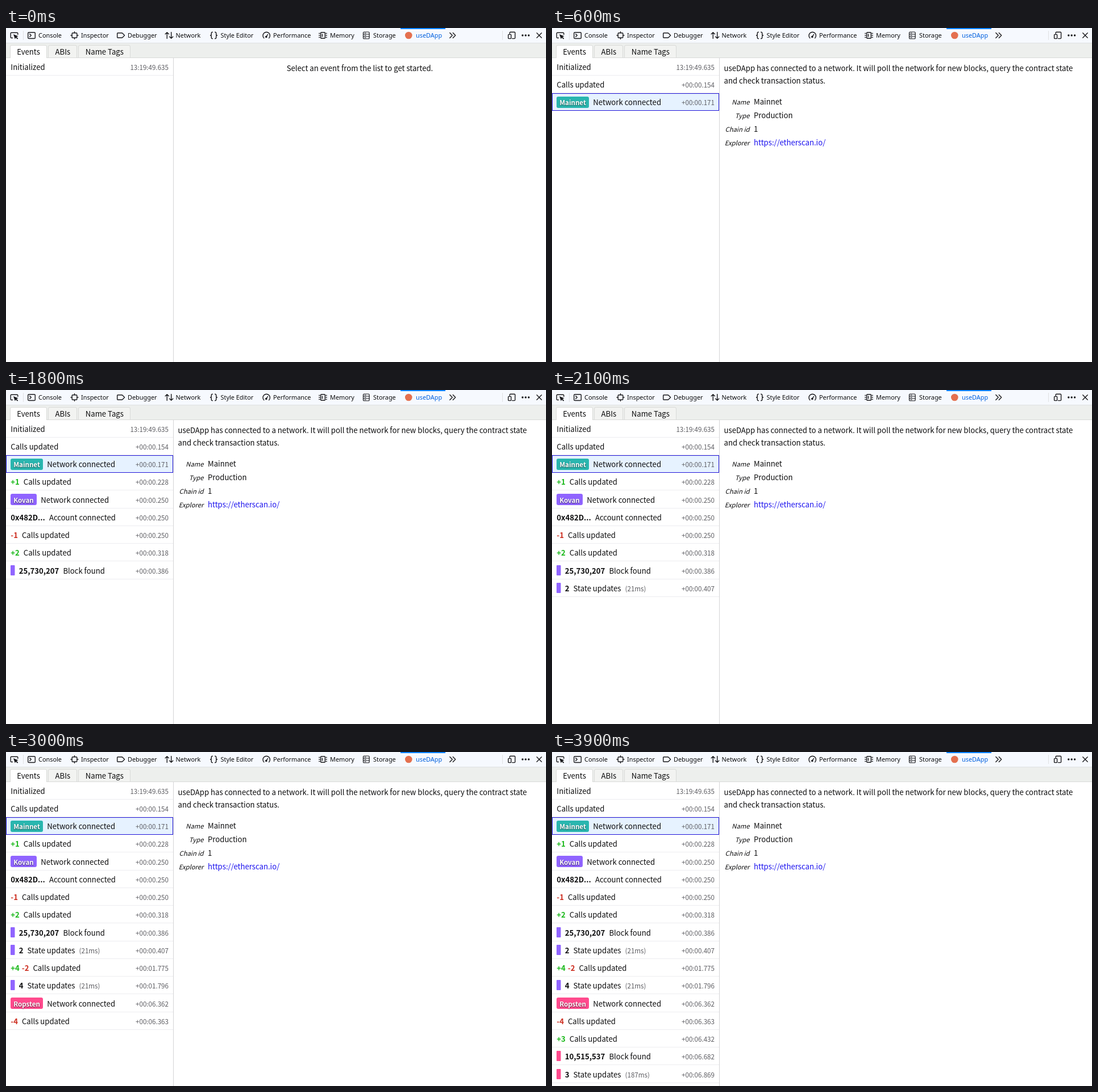
An HTML page that plays this animation: 950 px wide and 589 px high, repeating every 4200 ms.

```html
<!DOCTYPE html>
<html lang="en">
<head>
<meta charset="utf-8">
<title>Event log panel</title>
<style>
  html, body { margin: 0; width: 100%; height: 100%; overflow: hidden; background: #fff; }
  svg { display: block; width: 950px; height: 589px; }
  text { font: 13.15px "Noto Sans CJK JP", "Noto Sans CJK SC", "Noto Sans CJK", sans-serif; fill: #0c0c0d; white-space: pre; }
  .bar text { font: 10.9px "Noto Sans", "Open Sans", sans-serif; fill: #0c0c0d; }
  .bar .on { fill: #0060df; }
  .icon { fill: none; stroke: #18181b; stroke-width: 1.4; stroke-linejoin: round; stroke-linecap: round; }
  .fine { stroke-width: 1.2; }
  .solid { fill: #18181b; stroke: none; }
  .bold { font-weight: 700; }
  .plus { font-weight: 700; fill: #18b818; }
  .minus { font-weight: 700; fill: #cc2b1d; }
  .small { font-size: 11.6px; fill: #5c5c61; }
  .time { text-anchor: end; }
  .badge { font-size: 11.6px; font-weight: 700; fill: #fff; text-anchor: middle; text-shadow: 0 1px 2px #000a; }
  .label { font-size: 11.3px; font-style: italic; text-anchor: end; }
  .link { fill: #1a10ee; }
</style>
</head>
<body>
<svg viewBox="0 0 950 589" xmlns="http://www.w3.org/2000/svg">
  <g class="bar">
    <path fill="#f6f9fe" d="M0 0H950V26H0z"/>
    <path fill="#dfe0e2" d="M0 26H950V27H0zM30 5H31V21H30zM873 5H874V21H873z"/>
    <path fill="#0a84ff" d="M694 0H773V2H694z"/>
    <g class="icon">
      <path d="M11.5 17.5H9.5Q8.2 17.5 8.2 16.2V9.5Q8.2 8.2 9.5 8.2H19.5Q20.8 8.2 20.8 9.5V11.5"/>
      <path class="solid" d="M13 11L21.5 14.5L18.6 15.8L21.3 18.5L20 19.8L17.3 17.1L15.8 19.6z"/>
      <rect x="38.7" y="7.7" width="12.6" height="10.8" rx="1.6"/>
      <path d="M41.7 10.6L44.3 13.1L41.7 15.6"/>
      <rect x="116.2" y="8.7" width="8.6" height="8.6" rx="1"/>
      <path d="M120.5 6.5V8M120.5 18V19.5M114 13H115.5M125.5 13H127"/>
      <path d="M196.7 8.7H203.6Q204.5 8.7 205.2 9.5L208.6 13L205.2 16.5Q204.5 17.3 203.6 17.3H196.7Q195.7 17.3 195.7 16.3V9.7Q195.7 8.7 196.7 8.7z"/>
      <path d="M283.3 18.5V7.8M280.2 10.8L283.3 7.7L286.4 10.8M290.7 7.5V18.2M287.6 15.2L290.7 18.3L293.8 15.2"/>
      <path d="M363.3 7.3Q361.3 7.3 361.3 9.2V11.2Q361.3 13 359.5 13Q361.3 13 361.3 14.8V16.8Q361.3 18.7 363.3 18.7M367.7 7.3Q369.7 7.3 369.7 9.2V11.2Q369.7 13 371.5 13Q369.7 13 369.7 14.8V16.8Q369.7 18.7 367.7 18.7"/>
      <path d="M453.8 17.8A6.2 6.2 0 1 1 462.6 17.8M457.8 15.2L460.6 11.4"/>
      <circle class="solid" cx="457.8" cy="15.6" r="1.8"/>
      <rect x="553.7" y="7.7" width="7.6" height="10.6" rx="1"/>
      <path d="M550.8 9.5H552M550.8 13H552M550.8 16.5H552M563 9.5H564.2M563 13H564.2M563 16.5H564.2M556.5 11V15"/>
      <g class="fine">
        <rect x="628.5" y="7" width="10.6" height="12" rx="1.6"/>
        <path d="M628.5 11H639M628.5 15H639M631 9H633M631 13H633M631 17H633"/>
      </g>
      <path d="M780.8 8.5L785.2 13L780.8 17.5M786.3 8.5L790.7 13L786.3 17.5"/>
      <path d="M886.2 10V8.3Q886.2 7.2 887.3 7.2H894.5Q895.6 7.2 895.6 8.3V17.5Q895.6 18.6 894.5 18.6H890.5"/>
      <rect x="883.6" y="11.4" width="5" height="7.2" rx="0.9"/>
      <path d="M933.8 8.8L942.2 17.2M942.2 8.8L933.8 17.2"/>
      <g class="solid"><circle cx="908.8" cy="13" r="1.7"/><circle cx="914.2" cy="13" r="1.7"/><circle cx="919.6" cy="13" r="1.7"/></g>
    </g>
    <circle cx="708.3" cy="13" r="6.3" fill="#e4704f"/>
    <g id="tools"></g>
  </g>
  <path fill="#edefed" d="M0 27H950V52H0z"/>
  <path fill="#d9dad9" d="M0 52H950V53H0z"/>
  <g id="tabs"></g>
  <g id="list"></g>
  <path fill="#d4d4d6" d="M294 53H295V589H294z"/>
  <g id="prompt"><text x="622.5" y="76" text-anchor="middle">Select an event from the list to get started.</text></g>
  <g id="detail">
    <text x="302.5" y="76">useDApp has connected to a network. It will poll the network for new blocks, query the contract state</text>
    <text x="302.5" y="98">and check transaction status.</text>
  </g>
</svg>
<script>
const LOOP = 4200;
const TEAL = '#29b6af', VIOLET = '#9064ff', PINK = '#ff4a8d';
const byId = id => document.getElementById(id);
const text = (x, y, str, cls = '') => `<text x="${x}" y="${y}" class="${cls}">${str}</text>`;
const rect = (x, y, w, h, fill, extra = '') =>
  `<rect x="${x}" y="${y}" width="${w}" height="${h}" fill="${fill}" ${extra}/>`;

// Parts of a row: [string, class, gap before]
const plain = str => [str, '', 7];
const calls = (...diffs) => ({
  parts: [...diffs.map((d, i) => [d, d[0] === '+' ? 'plus' : 'minus', i ? 4 : 0]), plain('Calls updated')]
});
const network = (name, color, width) => ({ badge: { name, color, width }, parts: [plain('Network connected')] });
const block = (num, color) => ({ color, parts: [[num, 'bold', 0], plain('Block found')] });
const state = (num, ms, color) => ({
  color, parts: [[num, 'bold', 0], plain('State updates'), [`(${ms}ms)`, 'small', 7]]
});

// [appears at ms, time label, row]
const rows = [
  [0, '13:19:49.635', { parts: [['Initialized', '', 0]] }],
  [300, '+00:00.154', { parts: [['Calls updated', '', 0]] }],
  [600, '+00:00.171', { ...network('Mainnet', TEAL, 57), selected: true }],
  [900, '+00:00.228', calls('+1')],
  [1200, '+00:00.250', network('Kovan', VIOLET, 46)],
  [1200, '+00:00.250', { parts: [['0x482D...', 'bold', 0], plain('Account connected')] }],
  [1200, '+00:00.250', calls('-1')],
  [1500, '+00:00.318', calls('+2')],
  [1800, '+00:00.386', block('25,730,207', VIOLET)],
  [2100, '+00:00.407', state('2', 21, VIOLET)],
  [2400, '+00:01.775', calls('+4', '-2')],
  [2700, '+00:01.796', state('4', 21, VIOLET)],
  [3000, '+00:06.362', network('Ropsten', PINK, 57)],
  [3000, '+00:06.363', calls('-4')],
  [3300, '+00:06.432', calls('+3')],
  [3600, '+00:06.682', block('10,515,537', PINK)],
  [3900, '+00:06.869', state('3', 187, PINK)]
];

function drawRow([, time, row], i) {
  const top = 52.25 + 31.25 * i;
  const end = Math.round(top + 31.25);
  const base = Math.round(top + 21.3);
  let x = 8.3, out = '';
  if (row.selected) {
    const y = Math.round(top);
    out += rect(0.5, y + 0.5, 293, end - y - 1, '#e6f2ff', 'stroke="#1f14d8"');
  } else {
    out += rect(0, end - 1, 294, 1, '#ededf0');
  }
  if (row.badge) {
    const { name, color, width } = row.badge;
    out += rect(8, Math.round(top + 6), width, 20, color, 'rx="3"');
    out += text(8 + width / 2, base, name, 'badge');
    x += width;
  }
  if (row.color) {
    out += rect(8, Math.round(top + 6.4), 7.5, 18, row.color, 'rx="1"');
    x = 22.8;
  }
  const spans = row.parts.map(([str, cls, gap]) => `<tspan class="${cls}" dx="${gap}">${str}</tspan>`);
  out += text(x, base, spans.join(''));
  out += text(286, base - 0.5, time, 'small time');
  return `<g>${out}</g>`;
}

// Hard switch of opacity at a moment of the loop
function switchAt(el, at, from, to) {
  el.animate([
    { opacity: from, offset: 0, easing: 'step-end' },
    { opacity: to, offset: at / LOOP, easing: 'step-end' },
    { opacity: to, offset: 1 }
  ], { duration: LOOP, iterations: Infinity });
}

byId('tools').innerHTML = [
  [57, 'Console'], [132, 'Inspector'], [214, 'Debugger'], [298.5, 'Network'], [377.5, 'Style Editor'],
  [470, 'Performance'], [570, 'Memory'], [646, 'Storage'], [721, 'useDApp', 'on']
].map(([x, str, cls]) => text(x, 17, str, cls)).join('');

byId('tabs').innerHTML = [[8, 63, 'Events', 19.2], [75, 49, 'ABIs', 86.6], [128, 90, 'Name Tags', 139.8]]
  .map(([x, w, str, tx], i) => {
    const edge = `M${x - 0.5} 52V33Q${x - 0.5} 30.5 ${x + 2} 30.5H${x + w - 2}Q${x + w + 0.5} 30.5 ${x + w + 0.5} 33V52`;
    return `<path d="${edge}" fill="${i ? '#f2f3f1' : '#fff'}" stroke="#d9dad8"/>` +
      (i ? '' : rect(x, 51, w, 2, '#fff')) + text(tx, 47, str);
  }).join('');

byId('detail').innerHTML += [
  ['Name', 'Mainnet'], ['Type', 'Production'], ['Chain id', '1'], ['Explorer', 'https://etherscan.io/', 'link']
].map(([label, value, cls], i) =>
  text(347.5, 134.5 + 24 * i, label, 'label') + text(355, 135 + 24 * i, value, cls)).join('');

byId('list').innerHTML = rows.map(drawRow).join('');
[...byId('list').children].forEach((el, i) => {
  if (rows[i][0]) switchAt(el, rows[i][0], 0, 1);
});
switchAt(byId('detail'), 600, 0, 1);
switchAt(byId('prompt'), 600, 1, 0);
</script>
</body>
</html>
```
